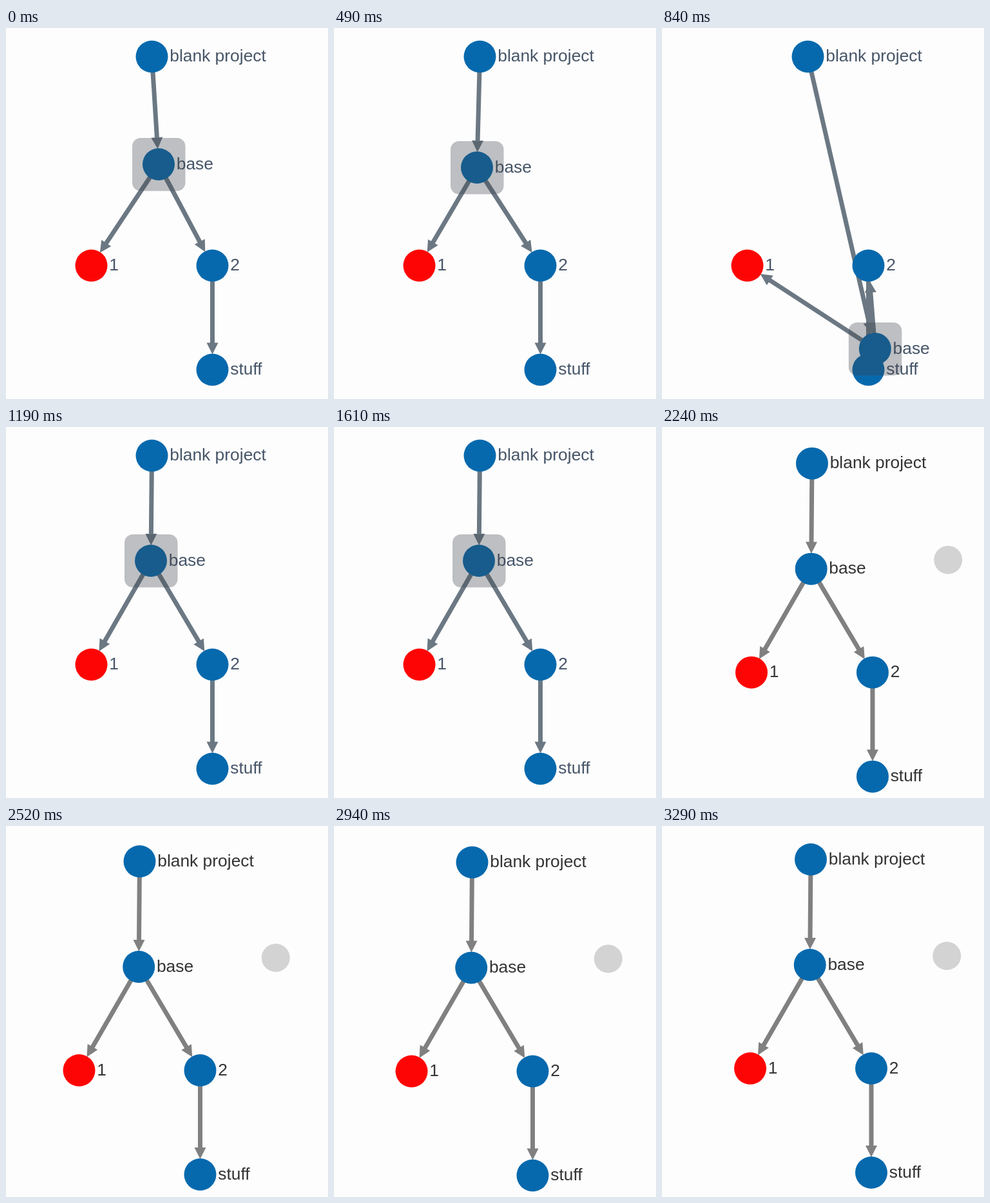
Write an HTML page with a canvas that moves like this. It is 500 px wide and 577 px high and loops after 3360 ms.

```html
<!DOCTYPE html>
<html lang="en">
<head>
<meta charset="utf-8">
<title>Project graph</title>
<style>
html, body { margin: 0; width: 100%; height: 100%; overflow: hidden; background: #fdfdfd; }
canvas { display: block; }
</style>
</head>
<body>
<canvas id="stage" width="500" height="577"></canvas>
<script>
const ctx = document.getElementById('stage').getContext('2d');
const STEP = 70, LOOP = 3360, PAN_START = 1820, RADIUS = 25;
const HOME = [226.5, 44.5];

const mix = (a, b, u) => [a[0] + (b[0] - a[0]) * u, a[1] + (b[1] - a[1]) * u];
const progress = (time, start, end) => Math.min(1, Math.max(0, (time - start) / (end - start)));

// One elliptical lap beginning at `angle` degrees while drifting between two points.
function lap(from, to, u, rx, ry, angle, direction) {
  const a0 = angle * Math.PI / 180, a = a0 + direction * 2 * Math.PI * u;
  const [x, y] = mix(from, to, u);
  return [x + rx * (Math.cos(a) - Math.cos(a0)), y + ry * (Math.sin(a) - Math.sin(a0))];
}

// The base node is swung around clockwise, twice.
function draggedBase(time) {
  const start = [237, 212], middle = [222, 217], rest = [225, 208];
  return time < 490
    ? lap(start, middle, progress(time, 0, 490), 178, 153, -88, 1)
    : lap(middle, rest, progress(time, 490, 1190), 127, 158, -115, 1);
}

// The whole graph is circled counterclockwise, twice, then eases to a stop.
function pannedRoot(time) {
  const left = [200.5, 48], low = [207.5, 55], bottom = [214.5, 56.5], rest = [231, 52];
  if (time < 2030) return HOME;
  if (time < 2520) return lap(left, low, progress(time, 2030, 2520), 15.5, 13, 180, -1);
  if (time < 2940) return lap(low, bottom, progress(time, 2520, 2940), 15, 5.5, 125, -1);
  return mix(bottom, rest, 1 - (1 - progress(time, 2940, 3150)) ** 3);
}

function disc([x, y], r, color) {
  ctx.fillStyle = color;
  ctx.beginPath();
  ctx.arc(x, y, r, 0, Math.PI * 2);
  ctx.fill();
}

function edge([x1, y1], [x2, y2], color) {
  const tip = Math.hypot(x2 - x1, y2 - y1) - RADIUS + 1;
  if (tip < 0) return;
  ctx.save();
  ctx.translate(x1, y1);
  ctx.rotate(Math.atan2(y2 - y1, x2 - x1));
  ctx.fillStyle = color;
  ctx.fillRect(0, -3.5, Math.max(0, tip - 16), 7);
  ctx.beginPath();
  ctx.moveTo(tip, 0);
  ctx.lineTo(tip - 18, -9);
  ctx.lineTo(tip - 18, 9);
  ctx.fill();
  ctx.restore();
}

function node([x, y], label, textColor, color = '#0669ad') {
  disc([x, y], RADIUS, color);
  ctx.fillStyle = textColor;
  ctx.font = '26.4px "Liberation Sans", Arial, sans-serif';
  ctx.fillText(label, x + 27.7, y + 7.7);
}

function draw(time) {
  const panning = time >= PAN_START;
  const root = panning ? pannedRoot(time) : HOME;
  const from = (dx, dy) => [root[0] + dx, root[1] + dy];
  const base = panning ? from(-1.3, 164) : draggedBase(time);
  const one = from(-94, 325), two = from(94, 325), stuff = from(94, 487);
  const line = panning ? '#808080' : '#6b7883';
  const text = panning ? '#333' : '#465568';

  ctx.fillStyle = '#fdfdfd';
  ctx.fillRect(0, 0, 500, 577);

  edge(root, base, line);
  edge(base, one, line);
  edge(base, two, line);
  edge(two, stuff, line);

  node(root, 'blank project', text);
  node(one, '1', text, '#fe0505');
  node(two, '2', text);
  node(stuff, 'stuff', text);
  node(base, 'base', text);

  if (panning) {
    disc(from(211.3, 150), 22, '#d3d3d3');
  } else {
    ctx.fillStyle = 'rgba(60, 65, 75, .33)';
    ctx.beginPath();
    ctx.roundRect(base[0] - 41, base[1] - 41, 82.5, 82.5, 13);
    ctx.fill();
  }
}

function tick() {
  const time = performance.now() % LOOP;
  draw(Math.floor(time / STEP) * STEP);
  requestAnimationFrame(tick);
}
tick();
</script>
</body>
</html>
```
